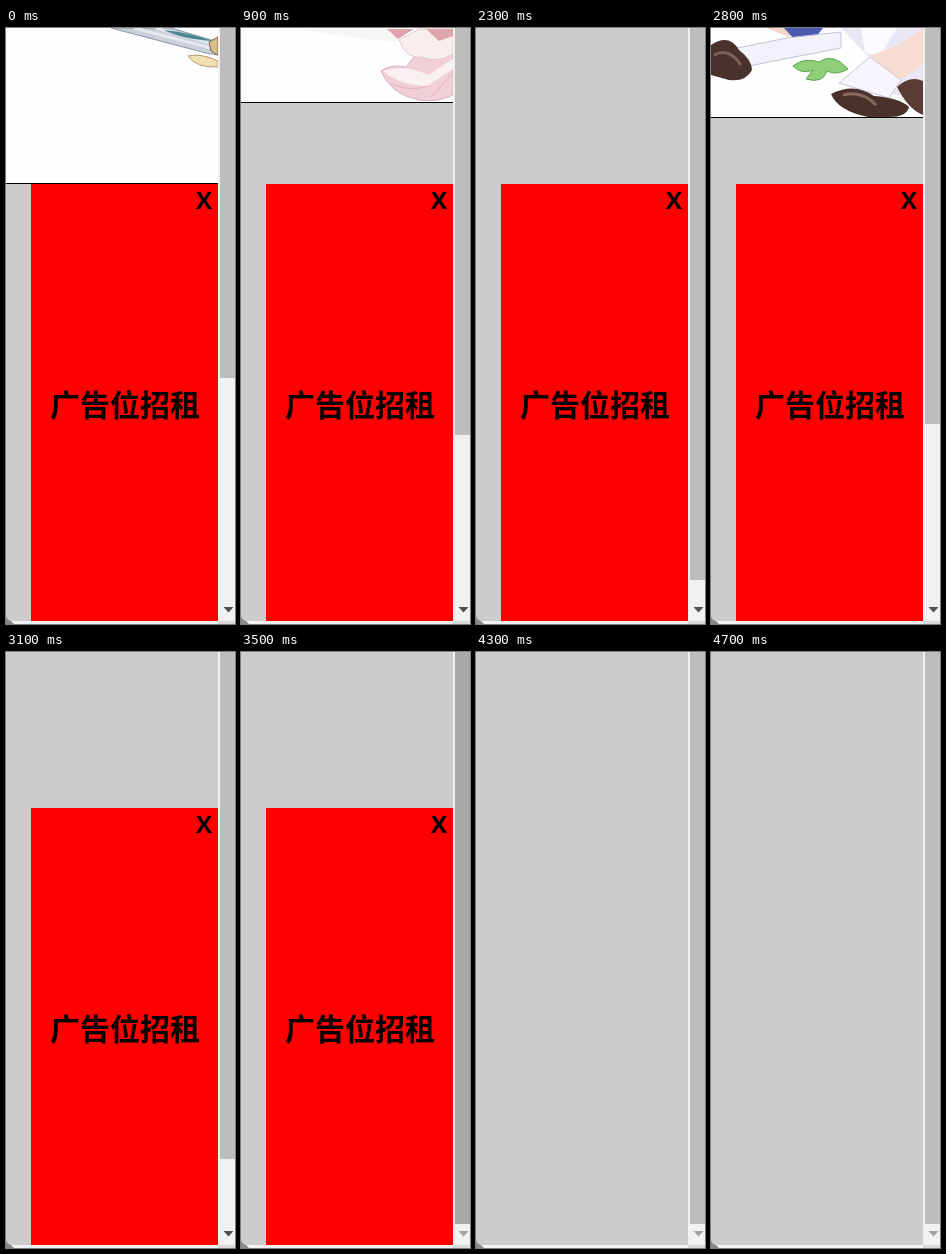
These frames come from a looping animation (229 by 596 pixels, 6.2 s). An HTML page:

```html
<!DOCTYPE html>
<html lang="zh">
<head>
<meta charset="utf-8">
<style>
html, body { margin: 0; width: 100%; height: 100%; overflow: hidden; background: #f3f3f3; }
svg { display: block; width: 229px; height: 596px; }
text { font-weight: 700; }
.latin { font: 700 24px "Noto Sans", sans-serif; }
.cjk { font: 700 30px "Noto Sans CJK SC", "Noto Sans CJK", sans-serif; }
</style>
</head>
<body>
<svg viewBox="0 0 229 596">
  <path d="M0 588V596H8Z" fill="#888"/>
  <path d="M0 0H212V593H7Q1 593 0 588Z" fill="#ccc"/>

  <!-- Scrolling page: y = 0 is the lower edge of the slide -->
  <g id="page">
    <rect y="-160" width="212" height="160" fill="#fefefe"/>
    <g class="slide">
      <path d="M105-155L200-130 212-128V-141L165-155Z" fill="#c9d0dc" stroke="#8d96a5"/>
      <path d="M128-155L205-135M150-155L208-139" fill="none" stroke="#e4e8ef" stroke-width="3"/>
      <path d="M158-153Q175-144 207-142Q185-150 158-153" fill="#4b8793"/>
      <path d="M203-141L212-146V-128L205-132Z" fill="#d9c08a" stroke="#80694a"/>
      <path d="M182-127Q196-130 212-122V-116Q190-115 182-127Z" fill="#f0dfb4" stroke="#b59a68"/>
    </g>
    <g class="slide">
      <path d="M60-73H150L165-60Q120-62 60-73Z" fill="#f6f6f6"/>
      <path d="M140-31Q149-38 165-35L176-49Q192-43 212-53V-7Q195 1 178-2Q149-8 140-31Z" fill="#f0d0d6" stroke="#dcb2bc"/>
      <path d="M146-73H173L157-63Z" fill="#e3a0ae"/>
      <path d="M158-62L178-73H212V-48Q196-38 181-45Q166-42 158-62Z" fill="#f8eeee" stroke="#e2c6ca"/>
      <path d="M185-73L198-61 212-66V-73Z" fill="#dfa5ac"/>
      <path d="M142-31Q166-38 187-27L212-43V-33L186-16Q160-16 142-31Z" fill="#faf0f1"/>
      <path d="M150-18Q170-10 187-16M190-5L212-29" fill="none" stroke="#dfb4be"/>
    </g>
    <g class="slide">
      <path d="M55-89H85L78-80Z" fill="#f5d6c8"/>
      <path d="M73-89H112L104-79 84-77Z" fill="#4c5bb0"/>
      <path d="M26-69L76-79 130-85V-69L78-59 38-51Z" fill="#f3f2fa" stroke="#c5c3d8"/>
      <path d="M0-72Q18-84 28-67Q41-57 41-47Q35-35 18-37L0-42Z" fill="#49312e"/>
      <path d="M3-62Q18-70 30-52" fill="none" stroke="#80605a" stroke-width="3"/>
      <path d="M82-51Q93-60 108-55Q122-65 137-48Q125-41 116-46Q112-33 95-38L102-47Q91-42 82-51Z" fill="#8fcf78" stroke="#5ca451"/>
      <path d="M130-89H212V-20L185-22Q160-29 130-34L158-60Z" fill="#e9e7f5"/>
      <path d="M150-89H186L168-59 154-65Z" fill="#fcfbff"/>
      <path d="M160-62L188-72 212-89V-53L185-33Z" fill="#f7dcd2"/>
      <path d="M128-34L159-60 190-37 178-19Z" fill="#f7f5fd" stroke="#c9c4da"/>
      <path d="M120-23Q143-35 163-21Q189-19 198-10Q196 0 178 0H157Q127-6 120-23Z" fill="#4b312b"/>
      <path d="M186-30Q199-42 212-36V-2Q197-8 186-30Z" fill="#5a3c34"/>
      <path d="M132-22Q151-27 165-12" fill="none" stroke="#8a685c" stroke-width="3"/>
    </g>
    <rect width="212" height="1"/>
  </g>

  <g id="ad">
    <rect x="25" y="156" width="187" height="437" fill="#f00"/>
    <text class="latin" x="190" y="181">X</text>
    <text class="cjk" x="44" y="387.5">广告位招租</text>
  </g>

  <rect x="212" width="17" height="593" fill="#f1f1f1"/>
  <rect id="thumb" x="214" width="15"/>
  <path id="arrow" d="M217.5 579H227.5L222.5 584.5Z"/>
  <rect x="212" y="593" width="17" height="3" fill="#d8d8d8"/>
</svg>
<script>
const LOOP = 6200, BOTTOM = 572;
// [time, value] steps
const thumbEnd = [
  [0, 350], [900, 407], [1000, 438], [1600, 450], [1700, 490], [1800, 527],
  [2300, 552], [2400, BOTTOM], [2700, 450], [2800, 396], [2900, 433],
  [3000, 470], [3100, 507], [3200, 544], [3300, BOTTOM]
];
const slideIndex = [[0, 0], [900, 1], [2700, 2]];
const hover = [[0, false], [3500, true], [3800, false], [4600, true], [4700, false]];

const $ = id => document.getElementById(id);
const slides = document.querySelectorAll(".slide");
const at = (steps, t) => steps.findLast(([start]) => start <= t)[1];

function draw(now) {
  const t = now % LOOP;
  const end = at(thumbEnd, t);
  const pageY = Math.round(155 - 1.425 * (end - 350));
  $("page").setAttribute("transform", `translate(0 ${pageY})`);
  slides.forEach((slide, i) => slide.style.display = i === at(slideIndex, t) ? "" : "none");
  $("thumb").setAttribute("height", end);
  $("thumb").setAttribute("fill", at(hover, t) ? "#a8a8a8" : "#bdbdbd");
  $("arrow").setAttribute("fill", end === BOTTOM ? "#a3a3a3" : "#505050");
  $("ad").style.display = t < 4300 ? "" : "none";
}

const origin = performance.now();
function tick() {
  draw(performance.now() - origin);
  requestAnimationFrame(tick);
}
tick();
</script>
</body>
</html>
```
